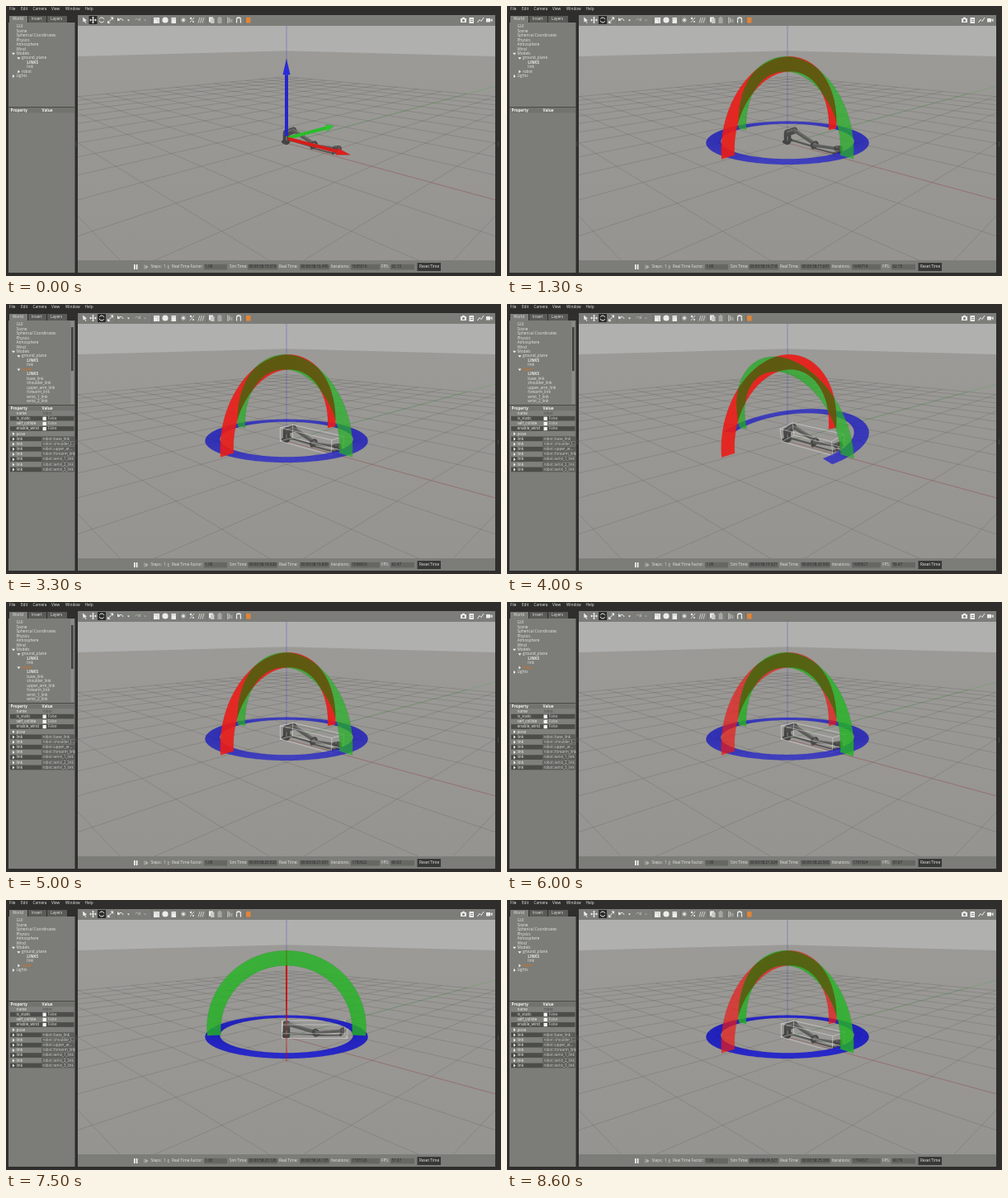
An HTML page with a canvas that plays this animation: 600x327 px, repeating every 8.7 s.

```html
<!DOCTYPE html>
<html lang="en">
<head>
<meta charset="utf-8">
<title>Robot simulator</title>
<style>
  html, body { margin: 0; width: 100%; height: 100%; overflow: hidden; background: #2f2e2c; }
  canvas { display: block; width: 100%; height: 100%; }
</style>
</head>
<body>
<canvas id="stage" width="600" height="327"></canvas>
<script>
const ctx = document.getElementById('stage').getContext('2d');
const LOOP = 8700, ROTATE_AT = 600, SELECT_AT = 3200, PITCH_AT = 5150, COLLAPSE_AT = 5600, YAW_AT = 6100;
const VIEW = { x: 87, y: 24, w: 506, h: 284 };
const PANEL = '#7c7d78', FRAME = '#2f2e2c';
const RAD = Math.PI / 180;

// ---------- 2D helpers ----------
function rect(x, y, w, h, color) { ctx.fillStyle = color; ctx.fillRect(x, y, w, h); }
function text(s, x, y, color = '#e6e6e3', bold = false, size = 4.7) {
  ctx.font = `${bold ? 'bold ' : ''}${size}px "Open Sans", sans-serif`;
  ctx.textBaseline = 'middle';
  ctx.fillStyle = color;
  ctx.fillText(s, x, y);
}
function trace(points) {
  ctx.beginPath();
  points.forEach(([x, y], i) => i ? ctx.lineTo(x, y) : ctx.moveTo(x, y));
}
function poly(points, color) { trace(points); ctx.fillStyle = color; ctx.fill(); }
function stroke(points, color, width = 1) {
  trace(points); ctx.strokeStyle = color; ctx.lineWidth = width; ctx.stroke();
}
function disc(x, y, r, color) {
  ctx.beginPath(); ctx.arc(x, y, r, 0, 7); ctx.fillStyle = color; ctx.fill();
}
function arc(x, y, r, from, to, color, width = 1) {
  ctx.beginPath(); ctx.arc(x, y, r, from, to);
  ctx.strokeStyle = color; ctx.lineWidth = width; ctx.stroke();
}
function expander(x, y, open) {
  poly(open ? [[x - 2, y - 1], [x + 2, y - 1], [x, y + 1.5]]
            : [[x - 1, y - 2], [x + 1.5, y], [x - 1, y + 2]], '#f4f4f2');
}

// ---------- camera at (5, -5, 2) looking at the world origin ----------
const TILT = Math.atan2(2, Math.hypot(5, 5)), FOCAL = 438;
function view([x, y, z]) {
  const dx = x - 5, dy = y + 5, dz = z - 2;
  const ahead = (dy - dx) * Math.SQRT1_2;
  return {
    right: (dx + dy) * Math.SQRT1_2,
    up: ahead * Math.sin(TILT) + dz * Math.cos(TILT),
    depth: ahead * Math.cos(TILT) - dz * Math.sin(TILT)
  };
}
function project(p) {
  const v = view(p);
  return [340 + FOCAL * v.right / v.depth, 166 - FOCAL * v.up / v.depth];
}
function line3(a, b, color, width) {
  const near = 0.15, da = view(a).depth, db = view(b).depth;
  if (da < near && db < near) return;
  const cut = a.map((v, i) => v + (b[i] - v) * (near - da) / (db - da));
  stroke([project(da < near ? cut : a), project(db < near ? cut : b)], color, width);
}

// Model pose: roll about x, pitch about y, yaw about z, raised above the ground.
function makePose(roll, pitch, yaw) {
  const turn = (a, b, angle) => {
    const c = Math.cos(angle), s = Math.sin(angle);
    return [a * c - b * s, a * s + b * c];
  };
  return ([x, y, z]) => {
    [y, z] = turn(y, z, roll);
    [z, x] = turn(z, x, pitch);
    [x, y] = turn(x, y, yaw);
    return [x, y, z + 0.1];
  };
}

// ---------- scene ----------
function drawGround() {
  rect(VIEW.x, VIEW.y, VIEW.w, VIEW.h, '#b0b0ae');
  const shade = ctx.createLinearGradient(0, 54, 0, 308);
  shade.addColorStop(0, '#9b9a97');
  shade.addColorStop(1, '#959491');
  const edge = [[-50, -40, 0], [-50, 50, 0], [40, 50, 0]].map(project);
  poly([...edge, [2330, 320], [-1650, 320]], shade);
  for (let i = -10; i <= 10; i++) {
    line3([i, -10, 0], [i, 10, 0], 'rgba(76,76,74,.38)', 0.6);
    line3([-10, i, 0], [10, i, 0], 'rgba(76,76,74,.38)', 0.6);
  }
  line3([0, 0, 0], [10, 0, 0], 'rgba(190,60,55,.45)', 0.6);
  line3([0, 0, 0], [0, 15, 0], 'rgba(70,165,60,.45)', 0.6);
  ctx.setLineDash([1.5, 0.8]);
  line3([0, 0, 0], [0, 0, 6], 'rgba(60,60,205,.8)', 0.7);
  ctx.setLineDash([]);
}

function drawRobot(pose) {
  const shoulder = [0, 0.2, 0.13], elbow = [0.6, 0.17, -0.04];
  const forearm = [0.62, 0.1, -0.04], wrist = [1.16, 0.1, 0.01];
  const parts = [
    [[0, 0, -0.06], [0, 0, 0.11], 8.5, '#444443'],
    [[0, 0, 0.11], shoulder, 8, '#4b4b4a'],
    [shoulder, elbow, 4.6, '#5a5a58'],
    [elbow, forearm, 8, '#464645'],
    [forearm, wrist, 3.8, '#5a5a58'],
    [wrist, [1.17, 0.2, 0], 6, '#484847'],
    [[1.17, 0.2, 0], [1.17, 0.22, -0.06], 5, '#4c4c4b']
  ];
  const shadow = p => { const [x, y, z] = pose(p); return [x - z * 0.55, y + z * 0.11, 0]; };
  ctx.lineCap = 'round';
  parts.forEach(([a, b, w]) => line3(shadow(a), shadow(b), 'rgba(60,60,59,.7)', w * 0.5));
  parts.forEach(([a, b, w, color]) => {
    line3(pose(a), pose(b), color, w);
    const lift = p => { const q = pose(p); return [q[0], q[1], q[2] + 0.025]; };
    line3(lift(a), lift(b), 'rgba(150,150,148,.4)', w * 0.25);
  });
  ctx.lineCap = 'butt';
}

function drawBounds(pose) {
  const lo = [-0.09, -0.09, -0.1], hi = [1.22, 0.27, 0.18];
  const corner = k => pose(lo.map((v, i) => k >> i & 1 ? hi[i] : v));
  for (let k = 0; k < 8; k++)
    for (const bit of [1, 2, 4])
      if (!(k & bit)) line3(corner(k), corner(k | bit), 'rgba(240,240,240,.75)', 0.6);
}

function drawArrow(pose, axis, fill, dark) {
  const at = d => project(pose(axis.map(v => v * d)));
  const [start, neck, tip] = [0.05, 1.27, 1.56].map(at);
  const len = Math.hypot(tip[0] - neck[0], tip[1] - neck[1]);
  const nx = -(tip[1] - neck[1]) / len * 4.3, ny = (tip[0] - neck[0]) / len * 4.3;
  const head = [[neck[0] + nx, neck[1] + ny], tip, [neck[0] - nx, neck[1] - ny]];
  stroke([start, neck], fill, 4);
  poly(head, fill);
  ctx.setLineDash([0.7, 1.5]);
  stroke([start, neck], dark, 4);
  ctx.setLineDash([]);
  stroke(head, dark, 0.5);
}

// Flat ring spanned by two axes; the part below the ground is hidden.
function ringPath(pose, u, v) {
  const path = new Path2D(), steps = 300;
  const point = (k, r) => {
    const a = k * 2 * Math.PI / steps;
    return pose(u.map((c, i) => r * (c * Math.cos(a) + v[i] * Math.sin(a))));
  };
  for (let k = 0; k < steps; k++) {
    const quad = [point(k, 1.33), point(k, 1.61), point(k + 1, 1.61), point(k + 1, 1.33)];
    if (quad.some(p => p[2] < 0)) continue;
    quad.map(project).forEach(([x, y], i) => i ? path.lineTo(x, y) : path.moveTo(x, y));
    path.closePath();
  }
  return path;
}
function paintRing(path, fill, edge) {
  ctx.fillStyle = fill; ctx.fill(path);
  ctx.strokeStyle = edge; ctx.lineWidth = 0.4; ctx.stroke(path);
}
// The ring that was grabbed last stays more opaque.
function drawRings(pose, t) {
  const X = [1, 0, 0], Y = [0, 1, 0], Z = [0, 0, 1];
  const red = ringPath(pose, Y, Z), green = ringPath(pose, X, Z), blue = ringPath(pose, X, Y);
  paintRing(blue, `rgba(30,30,215,${t > YAW_AT ? 0.88 : 0.68})`, 'rgba(20,20,150,.25)');
  paintRing(red, `rgba(240,30,25,${t > PITCH_AT ? 0.66 : 0.88})`, 'rgba(215,20,20,.4)');
  paintRing(green, `rgba(40,190,40,${t > PITCH_AT ? 0.8 : 0.68})`, 'rgba(20,110,20,.3)');
  ctx.save();
  ctx.clip(red);
  ctx.fillStyle = 'rgba(105,45,0,.5)';
  ctx.fill(green);
  ctx.restore();
}

// ---------- window ----------
function drawToolbar(rotating) {
  const c = '#ececea', dim = '#a6a7a2';
  rect(87, 11, 506, 13, PANEL);
  rect(rotating ? 111 : 100.5, 12, 10, 10, '#2d2d2b');
  [133, 176, 210, 243, 266, 277, 289].forEach(x => rect(x, 13, 0.6, 9, '#686964'));
  poly([[93, 13.5], [98, 17.5], [96, 18], [97.5, 20.5], [96.5, 20.8], [95, 18.5], [93.5, 19.5]], c);
  stroke([[102, 17], [109, 17]], c); stroke([[105.5, 13.5], [105.5, 20.5]], c);
  [0, 1, 2, 3].forEach(k => {
    const a = k * Math.PI / 2, s = Math.sin(a), o = Math.cos(a);
    poly([[105.5 + 4.3 * o, 17 + 4.3 * s], [105.5 + 2.5 * o - 1.7 * s, 17 + 2.5 * s + 1.7 * o],
          [105.5 + 2.5 * o + 1.7 * s, 17 + 2.5 * s - 1.7 * o]], c);
  });
  arc(116, 17, 3, 0.4, 2.9, c); arc(116, 17, 3, 3.6, 6, c);
  stroke([[124, 20], [129, 14.5]], c);
  poly([[126.5, 13.5], [130, 13.5], [130, 17]], c);
  poly([[123, 17.5], [123, 21], [126.5, 21]], c);
  [[139, 1, c], [159, -1, dim]].forEach(([x, side, color]) => {
    arc(x, 18.5, 3, Math.PI * 1.15, Math.PI * 1.95, color);
    poly([[x - side * 4, 14], [x - side * 4, 18], [x - side * 0.5, 17.5]], color);
    poly([[x + 8, 16.5], [x + 11, 16.5], [x + 9.5, 18.5]], color);
  });
  rect(179, 14, 7, 7, c); stroke([[179, 15.7], [184, 15.7], [184, 21]], '#aaa', 0.5);
  disc(193, 17, 3.6, c);
  rect(200.5, 14, 5.5, 7, c); stroke([[200.5, 15.6], [206, 15.6]], '#aaa', 0.5);
  for (let k = 0; k < 4; k++) {
    const s = Math.sin(k * Math.PI / 4) * 3.2, o = Math.cos(k * Math.PI / 4) * 3.2;
    stroke([[215 - o, 17 - s], [215 + o, 17 + s]], c, 0.6);
  }
  disc(215, 17, 1.5, c);
  stroke([[223, 20], [228, 14]], c, 0.8); disc(224, 15, 1.2, c); disc(227, 19, 1, c);
  [233, 235.5, 238].forEach(x => stroke([[x, 20.5], [x + 2, 14]], c, 0.7));
  rect(246, 13.5, 5, 6, c); rect(248, 15, 4.5, 6, '#c8c8c5');
  rect(256.5, 14, 5, 7, dim); rect(258, 13, 2, 1.5, dim);
  rect(268.5, 13.5, 0.8, 7.5, c); rect(270, 14.5, 2, 5.5, dim); rect(272.7, 16, 1.6, 4, dim);
  arc(282, 16.5, 2.5, Math.PI, 0, c, 1.3);
  rect(278.9, 16.5, 1.3, 4, c); rect(283.8, 16.5, 1.3, 4, c);
  rect(291, 14, 5.5, 6.5, '#e28436');
  rect(551, 15, 7, 5, c); rect(553, 13.8, 3, 1.5, c); disc(554.5, 17.5, 1.5, PANEL);
  rect(561.5, 14, 5.5, 7, c); rect(563, 16, 3, 0.6, '#555'); rect(563, 18, 3, 0.6, '#555');
  stroke([[571.5, 20], [574, 16.5], [576, 18.5], [579, 14]], c);
  rect(582, 15, 5, 4.5, c); poly([[587, 17], [589.5, 15], [589.5, 19.5]], c);
}

function drawTree(selected, expanded) {
  // indent level, label, state (1 open, 0 closed)
  const rows = [[0, 'GUI'], [0, 'Scene'], [0, 'Spherical Coordinates'], [0, 'Physics'],
    [0, 'Atmosphere'], [0, 'Wind'], [0, 'Models', 1], [1, 'ground_plane', 1],
    [2, 'LINKS'], [2, 'link'], [1, 'robot', expanded ? 1 : 0]];
  if (expanded)
    ['LINKS', 'base_link', 'shoulder_link', 'upper_arm_link', 'forearm_link', 'wrist_1_link', 'wrist_2_link']
      .forEach(name => rows.push([2, name]));
  else rows.push([0, 'Lights', 0]);
  rows.forEach(([level, label, open], i) => {
    const y = 25.1 + i * 5.45, x = 12.5 + level * 6.4;
    if (open !== undefined) expander(x - 3.5, y, open);
    text(label, x, y, label === 'robot' && selected ? '#d8701f' : '#e6e6e3', label === 'LINKS');
  });
  if (expanded) {
    rect(78.5, 21, 3.5, 100, '#8b8c87');
    rect(79, 28, 2.5, 53, '#41413f');
  }
}

function drawProperties() {
  const links = ['base_link', 'shoulder_l…', 'upper_ar…', 'forearm_link', 'wrist_1_link', 'wrist_2_link', 'wrist_3_link'];
  const rows = [['name', 'robot'], ['is_static', 'False'], ['self_collide', 'False'], ['enable_wind', 'False'],
    ['pose', ''], ...links.map(l => ['link', 'robot::' + l])];
  rows.forEach(([key, value], i) => {
    const y = 132.6 + i * 6.18, flag = value === 'False';
    rect(5, y - 3, 77.5, 5.7, i % 2 ? '#4c4d49' : '#7f807b');
    if (i > 4) rect(43, y - 2.7, 39.5, 5.1, '#5d5e5a');
    if (i > 3) expander(9, y, false);
    text(key, 12.5, y, '#f0f0ed');
    if (flag) rect(44.5, y - 2.2, 4.3, 4.3, '#f4f4f2');
    text(value, flag ? 51 : 44.5, y, i ? '#d4d4d1' : '#4a4a48', false, 4.4);
  });
}

function drawStatus(t) {
  const tick = Math.floor(t / 196 + 0.23);
  const ms = 15516 + Math.round(tick * 200.25);
  const clock = v => '00:00:58:' + (v / 1000).toFixed(3);
  const fps = t < 2000 ? '62.15' : t < 3500 ? '62.47' : t < 4500 ? '56.47'
    : t < 6000 ? '60.02' : t < 8100 ? '57.07' : '60.79';
  rect(87, 308, 506, 15, PANEL);
  rect(155, 313, 1.6, 6, '#f8f8f6'); rect(157.8, 313, 1.6, 6, '#f8f8f6');
  rect(167.5, 313.5, 0.9, 5, '#b5b5b2'); poly([[169.2, 313.5], [172.5, 316], [169.2, 318.5]], '#b5b5b2');
  text('Steps:', 175.5, 316); text('1', 191, 316);
  poly([[195.5, 315.5], [196.8, 313.8], [198, 315.5]], '#ccc');
  poly([[195.5, 316.7], [196.8, 318.3], [198, 316.7]], '#ccc');
  [['Real Time Factor:', 201, 240, 28, '1.00'],
   ['Sim Time:', 271, 293, 36, clock(ms)],
   ['Real Time:', 331, 356, 36, clock(ms + 979)],
   ['Iterations:', 394, 418, 35, String(1680000 + ms)],
   ['FPS:', 455, 466, 29, fps]].forEach(([label, x, fx, w, value]) => {
    text(label, x, 316);
    rect(fx, 312.8, w, 6.6, '#666763');
    text(value, fx + 1.5, 316.1, '#262625', false, 4.5);
  });
  rect(498.5, 311, 28.5, 10, '#383836');
  text('Reset Time', 501, 316, '#ececea');
}

function drawWindow(t) {
  rect(0, 0, 600, 11, FRAME);
  [['File', 4], ['Edit', 18], ['Camera', 32.5], ['View', 55], ['Window', 72], ['Help', 95.5]]
    .forEach(([label, x]) => text(label, x, 4.2));
  rect(0, 10, 87, 317, FRAME);
  rect(593.5, 10, 6.5, 317, FRAME);
  rect(0, 323, 600, 4, FRAME);
  [[4, 22, 'World'], [27, 22, 'Insert'], [50, 24, 'Layers']].forEach(([x, w, label], i) => {
    rect(x, 12, w, 8, i ? '#5a5b57' : PANEL);
    text(label, x + 4, 16.2);
  });
  rect(3, 20, 80.5, 303, PANEL);
  drawTree(t >= SELECT_AT, t >= SELECT_AT && t < COLLAPSE_AT);
  rect(3, 122, 80.5, 1, '#4a4a47');
  rect(4, 123.2, 79, 6.2, '#72736e');
  text('Property', 5.5, 126.4, '#f4f4f2', true);
  text('Value', 43.5, 126.4, '#f4f4f2', true);
  if (t >= SELECT_AT) drawProperties();
  [85.2, 596.5].forEach(x => [165, 167, 169].forEach(y => disc(x, y, 0.5, '#777673')));
  drawToolbar(t >= ROTATE_AT);
  drawStatus(t);
}

// Smooth rise from start to peak, then smooth return to zero at end.
function swing(t, start, peak, end) {
  const u = Math.max(0, Math.min(1, t < peak ? (t - start) / (peak - start) : (end - t) / (end - peak)));
  return u * u * (3 - 2 * u);
}

function frame(now) {
  const t = now % LOOP;
  const pose = makePose(swing(t, 3500, 4050, 4800) * 11.2 * RAD,
                        swing(t, PITCH_AT, 5600, 6050) * -10 * RAD,
                        swing(t, YAW_AT, 7500, 8500) * 45 * RAD);
  ctx.save();
  ctx.beginPath();
  ctx.rect(VIEW.x, VIEW.y, VIEW.w, VIEW.h);
  ctx.clip();
  drawGround();
  drawRobot(pose);
  if (t >= SELECT_AT) drawBounds(pose);
  if (t < ROTATE_AT) {
    drawArrow(pose, [0, 1, 0], '#2fc42f', 'rgba(20,130,20,.4)');
    drawArrow(pose, [0, 0, 1], '#2a2ae0', 'rgba(15,15,110,.5)');
    drawArrow(pose, [1, 0, 0], '#e0201c', 'rgba(130,10,10,.4)');
  } else drawRings(pose, t);
  ctx.restore();
  drawWindow(t);
  requestAnimationFrame(frame);
}
requestAnimationFrame(frame);
</script>
</body>
</html>
```
